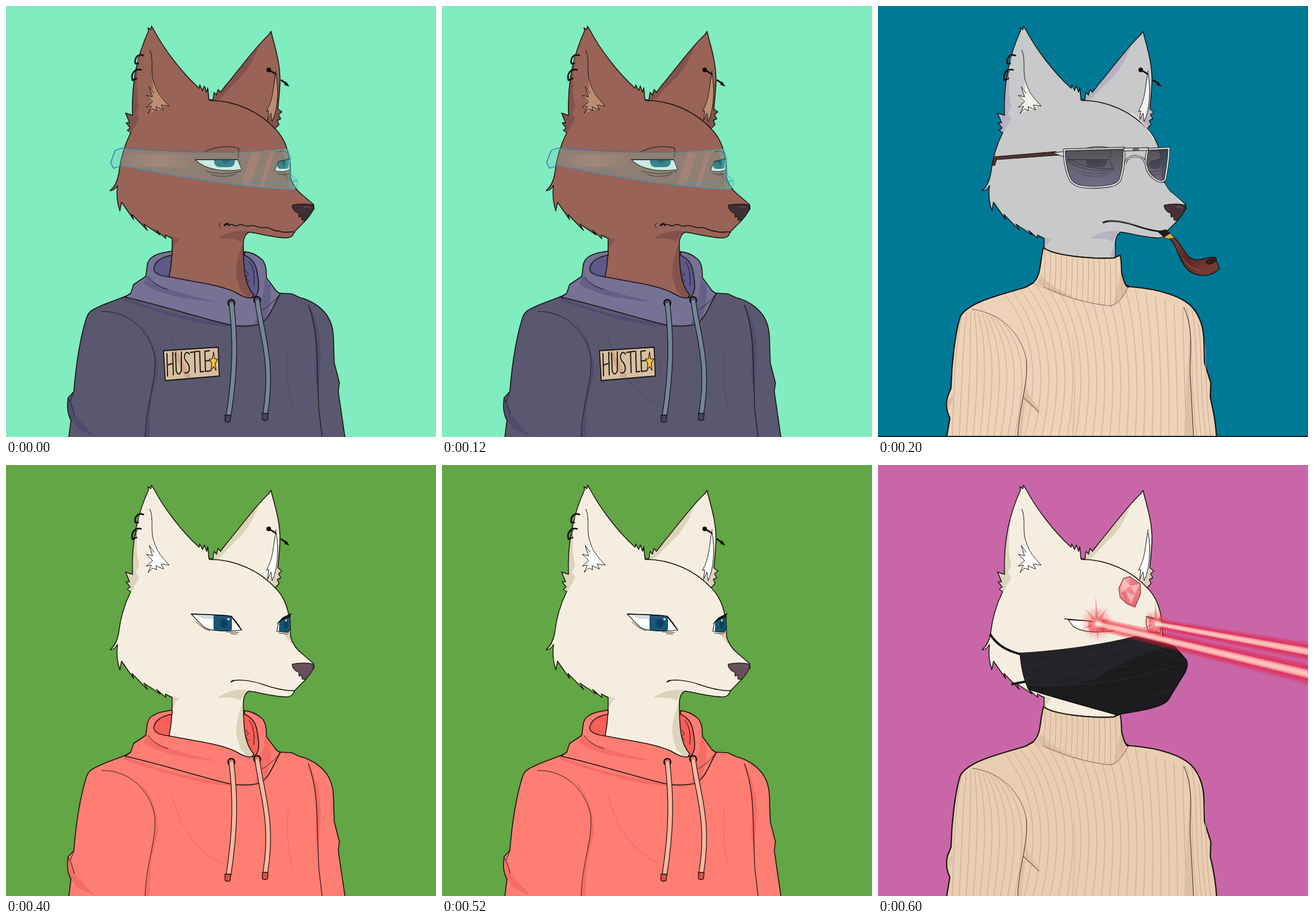
These frames come from a looping animation (748x749 px, 800 ms). An HTML page with a canvas:

```html
<!DOCTYPE html>
<html lang="en">
<head>
<meta charset="utf-8">
<title>Four outfits</title>
<style>
html, body { margin: 0; width: 100%; height: 100%; overflow: hidden; }
canvas { display: block; width: 100%; height: 100%; }
</style>
</head>
<body>
<canvas id="stage" width="748" height="749"></canvas>
<script>
const W = 748, H = 749, STEP = 200;
const g = document.getElementById('stage').getContext('2d');
const INK = '#17130f';

function fill(d, color) {
  g.fillStyle = color;
  g.fill(new Path2D(d));
}
function line(d, width = 1.3, color = INK) {
  g.strokeStyle = color;
  g.lineWidth = width;
  g.stroke(new Path2D(d));
}
function shape(d, color, width = 1.5, ink = INK) {
  fill(d, color);
  line(d, width, ink);
}
function dot(x, y, rx, ry, color) {
  g.fillStyle = color;
  g.beginPath();
  g.ellipse(x, y, rx, ry, 0, 0, 7);
  g.fill();
}
function clipped(d, draw) {
  g.save();
  g.clip(new Path2D(d));
  draw();
  g.restore();
}
function ramp(x0, y0, x1, y1, ...colors) {
  const r = g.createLinearGradient(x0, y0, x1, y1);
  colors.forEach((c, i) => r.addColorStop(i / (colors.length - 1), c));
  return r;
}
const mix = (a, b, k) => a + (b - a) * k;

// Head
const EARS = 'M217 220L211 216 216 212 209 203 215 203 208 186 220 190C218 130 229 85 248 43L247 38 252 41 253 35 258 43C275 75 305 115 336 143L337 137 342 147 345 139 349 150 351 142 353 163L360 163 362 150 366 155 369 145 373 150 383 137C410 105 435 70 457 50L461 44 464 56C472 85 479 112 476 145L473 179 480 184 474 189 478 196 472 199 475 206 468 213';
const FACE = 'C485 230 491 250 494 274L495 298C498 310 506 321 514 327L535 345 536 352 521 373 515 379 502 392C499 399 497 402 490 403C465 403 440 395 423 393C414 397 412 407 413 420C413 455 415 485 431 502L420 520 284 520 284 470C289 445 289 425 289 404L277 398 278 404 262 390 268 398 240 379 246 390 219 362 222 371 201 341 198 356C193 341 192 326 194 312C190 319 186 321 181 321C190 314 194 303 196 292C199 265 206 242 217 220Z';
const HEAD = EARS + FACE;
const NOSE = 'M498 346C512 343 527 344 535 346L535 353C530 363 524 370 520 373L515 372 514 365 510 367 509 360C503 359 497 351 498 346Z';

function drawHead(c) {
  fill(HEAD, c.fur);
  clipped(HEAD, () => {
    fill('M217 222L205 180 222 110 234 80C227 112 225 150 232 175L226 186 232 196Z', c.shade);
    fill('M355 168L400 110 440 70C430 95 418 115 408 124L385 147 373 160Z', c.shade);
    fill('M464 212L457 198 470 160 477 120 490 200Z', c.shade);
    fill('M368 404C388 391 408 388 430 393L440 398 414 398 408 410C398 402 383 405 368 404Z', c.shade);
    fill('M414 408C402 436 397 462 403 478L408 494 425 512 440 500Z', c.shade);
    fill('M277 398L302 406C293 411 289 424 287 440L283 410Z', c.shade);
    fill('M480 289L497 292 499 314Z', c.shade);
    fill('M196 335C206 359 231 377 258 387L278 405 220 384Z', c.shade);
  });
  line(HEAD, 1.5);
  line('M353 164C400 164 441 184 469 214', 1.6);
  fill('M254 105C253 129 262 150 284 174L271 175 274 181 262 180 247 187 253 178 244 176 254 169 244 155 254 158 249 140 256 145Z', c.ear);
  line('M250 76C258 94 250 116 258 135C263 151 271 160 284 174L270 172 274 181 261 175 262 182 255 179 247 187 253 174 244 176 255 166 244 155 255 158 249 140 258 152', 1);
  fill('M470 118C475 150 472 182 463 201L460 190 455 199 457 182 453 183C462 165 466 142 470 118Z', c.ear);
  line('M470 112C464 142 466 160 453 183L457 182 455 199 461 186 463 201C472 182 475 150 470 118', 1);
  if (c.rings) drawPiercings();
}

function drawPiercings() {
  g.lineCap = 'round';
  line('M239 86C229 82 223 91 225 100L230 100', 2.8, '#111');
  line('M235 111C223 108 217 119 220 129L227 126', 2.8, '#111');
  line('M231 87Q229 92 230 97M228 113Q225 118 226 123', 2, '#555');
  line('M457 111L469 118M479 129L489 136', 2.8, '#111');
  dot(457, 111, 4, 4, '#111');
  fill('M484 137L487 131 493 140Z', '#111');
  g.lineCap = 'butt';
}

function drawNose(color) {
  shape(NOSE, color, 1.2);
  line('M518 350Q528 347 530 352', 1, '#7c6870');
}

const MOUTH = 'M391 377C399 371 426 374 446 381C466 388 487 393 503 392';

// Hoodie
const HOOD_BODY = 'M109 752L113 720C105 705 107 690 108 681L118 670C122 620 130 575 139 545C143 530 150 528 165 521C185 512 205 507 217 500L476 499 497 500 512 507C530 511 548 523 558 537C568 552 570 566 570 590L571 620 580 655 578 670 590 752Z';
const HOOD_BACK = 'M249 445C261 431 275 428 289 426L415 427C435 429 451 440 452 460L440 515 255 475Z';
const HOOD_BAND = 'M207 506L217 499 222 484 243 470C246 455 244 445 252 438C262 430 275 428 289 426L289 433C267 437 258 446 257 457C258 466 270 469 285 471C330 480 370 484 398 497C412 505 420 509 430 507C441 502 441 487 438 470C436 450 430 440 415 433L415 427C430 428 440 436 446 441C453 450 453 463 453 472L470 495 477 500C465 520 458 545 441 553C425 557 400 557 385 553C320 537 270 520 207 506Z';

function drawHoodBack(c) {
  fill(HOOD_BODY, c.cloth);
  clipped(HOOD_BODY, () => {
    fill('M205 506C280 535 355 554 441 553L428 558C350 562 275 535 205 512Z', c.fold);
    fill('M225 545C260 580 267 622 253 661L241 752 249 752 252 690 264 640C265 590 245 560 225 545Z', c.fold);
    fill('M527 519C555 570 548 620 542 680L538 640C540 590 537 550 527 519Z', c.fold);
    fill('M108 682L119 710 155 749 125 735 112 718Z', c.fold);
    line('M288 572Q304 630 326 652Q346 678 376 692M491 595Q486 650 498 700', 1.5, c.fold);
  });
  line(HOOD_BODY, 1.6);
  line('M166 531C216 529 253 569 259 612C261 660 243 693 242 750', 0.9);
  line('M526 519C541 560 541 600 542 640L544 700 550 750', 1.2);
  line('M108 682Q114 691 119 710M118 670L112 687', 1);
  shape(HOOD_BACK, c.lining, 1.4);
}

function drawHoodFront(c) {
  shape(HOOD_BAND, c.band, 1.6);
  clipped(HOOD_BAND, () => {
    fill('M245 469C260 490 310 500 370 515C310 509 260 501 239 482Z', c.bandFold);
    fill('M450 472Q449 505 432 554L447 551Q464 519 460 487Z', c.bandFold);
  });
  line('M247 470Q259 487 282 493M475 503Q459 521 446 528', 0.9);
  line('M423 444Q434 458 431 486M417 460L422 467 416 472 423 479', 1);
  const strings = [
    'M392 516C399 575 400 630 387 713',
    'M437 511C444 570 466 618 451 709'
  ];
  strings.forEach((d, i) => {
    const x = i ? 437 : 392, y = i ? 511 : 516;
    dot(x, y, 7, 7, INK);
    dot(x, y, 4.5, 4.5, c.fold);
    line(d, 9.5);
    line(d, 7, c.cord);
    const ex = i ? 451 : 386, ey = i ? 708 : 711;
    shape(`M${ex - 5} ${ey}L${ex + 5} ${ey} ${ex + 4} ${ey + 11}Q${ex} ${ey + 14} ${ex - 5} ${ey + 11}Z`, c.tip, 1.3);
  });
}

// Sweater
const RIM = 'M288 420C305 434 372 440 410 438L421 433';
const KNIT = RIM + 'L424 465C428 481 430 488 441 488C490 492 531 505 548 525C561 541 567 562 567 584L568 620 579 655 578 680C584 705 588 725 589 752L119 752 125 716C117 700 119 687 121 679L127 664C128 620 134 570 143 540C156 516 204 504 256 489L274 479C284 466 282 440 288 420Z';
const COLLAR = RIM + 'C424 442 423 455 424 465C428 478 429 486 436 489C426 505 418 521 404 521C360 517 305 501 270 481C285 467 281 443 288 420Z';
const TORSO = 'M163 527C214 533 249 569 258 614C262 660 245 693 243 752L549 752 543 640C542 600 549 566 531 523L440 489 404 521 270 481Z';
const SLEEVE = 'M119 752L125 716C117 700 119 687 121 679L127 664C128 620 134 570 143 540L163 527C214 533 249 569 258 614C262 660 245 693 243 752Z';
const CUFF = 'M531 523C550 565 542 600 543 640L549 752 592 752 580 655 567 580 548 525Z';

function drawSweater(c) {
  const rib = c.rib;
  shape(KNIT, c.knit, 2.2);
  clipped(TORSO, () => {
    for (let i = 0; i < 20; i++) {
      const k = i / 19, top = mix(205, 532, k), end = mix(254, 536, k);
      const bend = mix(60, -4, k);
      line(`M${top} 484C${top + bend} 545 ${end + bend * .55} 630 ${end} 752`, 1, rib);
    }
    fill('M256 630L249 690 243 752 249 752 256 688 285 708 260 672Z', c.knitShade);
    fill('M336 560Q346 640 337 752L340 752Q348 635 336 560Z', c.knitShade);
    fill('M545 540L538 640 532 752 551 752Z', c.knitShade);
  });
  clipped(SLEEVE, () => {
    for (let i = 0; i < 10; i++) {
      const k = i / 9, top = mix(148, 207, k), end = mix(129, 237, k);
      const mid = mix(133, 258, k);
      line(`M${top} ${mix(528, 539, k)}C${mid} 590 ${mid} 650 ${end} 752`, 1, rib);
    }
    fill('M121 683L135 677 123 699Z', c.knitShade);
  });
  clipped(CUFF, () => {
    for (let i = 0; i < 4; i++) {
      const x = 541 + i * 8;
      line(`M${x - 5} 520C${x + 10} 580 ${x} 650 ${x + 14} 752`, 1, rib);
    }
  });
  shape(COLLAR, c.knit, 0.8, rib);
  clipped(COLLAR, () => {
    fill('M284 468L275 481 305 497 345 506Q300 490 284 468Z', c.knitShade);
    fill('M423 460L409 521 437 492Z', c.knitShade);
    for (let i = 0; i < 15; i++) {
      const x = 290 + i * 9.4;
      line(`M${x} 420Q${x + 3} 468 ${x - 7 + i * .7} 525`, 1, rib);
    }
  });
  line(RIM + 'C424 442 423 455 424 465C428 478 429 486 436 489M288 420C281 443 285 467 270 481L256 489', 2);
  line('M288 488C325 505 367 518 404 521Q420 518 434 491', 0.8, '#6b5244');
  line('M163 527C214 533 249 569 258 614', 1, '#6b5244');
  line('M258 614C262 660 245 693 243 750M253 680Q264 690 280 706M532 523C550 565 542 600 543 640L549 750', 0.9);
}

// Faces
function eyeShape(d, white, iris, x, y, rx, ry) {
  fill(d, white);
  clipped(d, () => {
    g.fillStyle = iris;
    g.beginPath();
    g.roundRect(x - rx, y - ry, rx * 2, ry * 2, rx * .5);
    g.fill();
    dot(x + 2, y + 1, rx * .4, ry * .45, 'rgba(5,30,50,.4)');
  });
  line(d, 1.1);
}

function sleepyEyes(white, iris) {
  eyeShape('M329 267L403 267 410 284C384 288 349 287 329 267Z', white, iris, 380, 266, 18, 14);
  eyeShape('M467 286L474 270 493 266 494 284C486 289 475 288 467 286Z', white, iris, 482, 271, 10, 12);
  line('M329 267L404 267M473 271L495 265', 2);
  line('M344 254C363 244 388 242 405 247L404 264M474 254L482 251 489 255M347 287Q377 296 409 287M357 293Q380 300 400 292M472 291Q484 296 494 290', 1);
}

function visorFace() {
  sleepyEyes('#eef5f1', '#216c7a');
  line('M380 383C380 376 390 377 387 382C393 375 398 386 404 381C412 376 414 386 424 382C435 379 438 387 449 385C459 383 462 391 474 391C486 396 493 391 503 393', 1.6);
  line('M380 382Q382 377 388 380', 3);
  line('M374 377Q367 381 374 386', 1);
  drawNose('#3d3034');
  const visor = 'M201 247C295 254 400 258 490 249L495 263 496 293 507 303 508 310 500 318C405 315 300 297 203 277L187 282 182 272 190 251Z';
  fill(visor, 'rgba(115,200,190,.27)');
  clipped(visor, () => {
    g.fillStyle = ramp(200, 0, 330, 0, 'rgba(214,157,137,0)', 'rgba(214,157,137,.3)', 'rgba(214,157,137,0)');
    g.fillRect(200, 258, 130, 22);
    fill('M427 255L443 255 424 315 408 315ZM459 255L467 255 448 315 440 315Z', 'rgba(232,150,130,.2)');
    fill('M480 240L510 240 510 320 494 320Z', 'rgba(100,220,210,.22)');
  });
  line(visor, 1.3, ramp(182, 0, 508, 0, '#3a86ad', '#5c658c', '#55747f', '#4ac7c4'));
  line('M201 247L190 251 182 272 187 282 203 277', 1.2, '#4277b0');
  line('M420 308L500 305 507 303M203 277C300 297 405 315 500 318', 1.3, '#4c94a8');
}

function drawPatch() {
  shape('M274 599L369 593 371 643 277 651Z', '#d8bfa2', 1.8);
  fill('M288 600L298 599 323 646 313 647Z', 'rgba(190,140,120,.45)');
  g.lineCap = 'round';
  line('M280 604L281 643M290 602L291 641M281 624L290 621M295 603L296 634Q300 645 305 634L305 601M319 605C313 596 307 609 313 617C322 626 320 641 311 637M321 602L335 600M328 601L329 637M337 600L338 636 344 635M354 599L346 600 347 635 356 634M347 617L354 616', 1.9);
  g.lineCap = 'butt';
  let star = '';
  for (let i = 0; i < 10; i++) {
    const a = -Math.PI / 2 + i * Math.PI / 5, r = i % 2 ? .42 : 1;
    star += (i ? 'L' : 'M') + (361 + Math.cos(a) * r * 7.5) + ' ' + (619 + Math.sin(a) * r * 18);
  }
  shape(star + 'Z', '#f2c53d', 1.1);
}

function shadesFace() {
  sleepyEyes('#b8b8be', '#26384c');
  clipped(HEAD, () => line('M440 186Q462 200 480 232M497 308Q509 323 532 345', 2.5, 'rgba(255,255,255,.6)'));
  line(MOUTH, 2.8);
  line('M400 374Q430 373 466 386', 0.8, '#77777b');
  drawNose('#453338');
  shape('M198 277L202 262 309 253 316 259 206 267 203 277Z', '#54312e', 1.2);
  shape('M303 255L325 253 327 264 315 259Z', '#d7d7da', 1);
  const lenses = [
    'M324 250L428 247C429 270 425 291 421 302C417 312 399 315 372 315C346 315 337 309 332 297C326 281 324 266 324 250Z',
    'M469 249L506 247C506 268 502 286 500 299C498 307 490 307 480 299C469 291 466 282 466 267Z'
  ];
  for (const d of lenses) {
    fill(d, ramp(0, 248, 0, 316, 'rgba(58,57,64,.83)', 'rgba(82,77,91,.83)', 'rgba(94,92,130,.84)'));
    line(d, 4.4);
    line(d, 2.6, '#d4d4d8');
  }
  line('M331 263C350 281 382 284 411 282', 1, 'rgba(15,15,20,.5)');
  shape('M427 247L470 246 470 251 427 252Z', '#d2d2d6', 1.1);
  line('M443 249L454 249', 3, '#555');
  const bridge = 'M430 274C433 260 449 258 459 264Q464 267 466 277';
  line(bridge, 3.6);
  line(bridge, 2, '#d4d4d8');
  drawPipe();
}

function drawPipe() {
  const pipe = 'M487 392L501 389 514 401C530 415 534 438 552 441C565 443 570 435 586 437L594 456C583 468 567 471 549 465C530 457 524 432 515 414Q508 401 495 399Z';
  shape(pipe, ramp(520, 410, 562, 466, '#713a32', '#582724', '#753b36'), 1.5);
  fill('M487 392L501 389 507 395 499 402Z', '#211b1d');
  shape('M497 402L508 395 516 403 505 405Z', '#d9a73e', 0.8);
  shape('M570 445Q576 436 588 437Q592 443 580 448Q571 450 570 445Z', '#361d1b', 1);
  line('M530 438Q541 457 562 460', 2, 'rgba(180,100,88,.5)');
}

function calmFace() {
  eyeShape('M322 259C351 260 376 260 392 263Q401 272 410 287C387 289 357 290 345 282C335 274 330 266 322 259Z', '#fff', '#145777', 377, 274, 16, 18);
  fill('M331 261L391 263 398 270 342 267Z', 'rgba(80,90,140,.22)');
  eyeShape('M471 289L474 273 494 262 495 283 491 291Z', '#fff', '#145777', 485, 276, 10, 18);
  fill('M470 277L481 265 497 257 494 264 480 270Z', INK);
  line('M322 259C351 260 376 260 392 263L410 287', 1.8);
  line('M330 272Q344 286 355 288M383 290L405 291M390 293L402 294M474 292L490 294', 0.9);
  dot(387, 268, 2, 2, '#cfe6ef');
  dot(487, 270, 1.5, 2, '#cfe6ef');
  line(MOUTH, 1.5);
  line('M391 377L397 374', 2.5);
  drawNose('#65505c');
}

function glow(x, y, r, color, alpha) {
  const s = g.createRadialGradient(x, y, 0, x, y, r);
  s.addColorStop(0, `rgba(${color},${alpha})`);
  s.addColorStop(1, `rgba(${color},0)`);
  g.fillStyle = s;
  g.fillRect(x - r, y - r, r * 2, r * 2);
}

function flare(x, y, size) {
  glow(x, y, size * .75, '245,70,75', .7);
  for (let i = 0; i < 10; i++) {
    const a = i * Math.PI / 5 - Math.PI / 2 - .05, r = size * (i ? .6 + .2 * (i % 2) : 1.2);
    const dx = Math.cos(a), dy = Math.sin(a);
    fill(`M${x - dy * 3} ${y + dx * 3}L${x + dx * r} ${y + dy * r} ${x + dy * 3} ${y - dx * 3}Z`, 'rgba(226,57,65,.4)');
  }
}

// Soft halo built from nested wedges, with a pale core
function beam(x, y, endY, size) {
  const wedge = (a, b, color) =>
    fill(`M${x} ${y - a}L752 ${endY - b} 752 ${endY + b} ${x} ${y + a}Q${x - a * 1.4} ${y} ${x} ${y - a}Z`, color);
  for (let i = 0; i < 12; i++) {
    const k = 1 - i / 12;
    wedge(12 * k * size, 20 * k * size, 'rgba(228,28,58,.13)');
  }
  for (let i = 0; i < 6; i++) {
    const k = 1 - i / 6;
    wedge(5 * k * size, 8 * k * size, 'rgba(255,208,198,.36)');
  }
  glow(x, y, 12, '255,242,232', .9);
}

function maskFace() {
  eyeShape('M331 269C348 271 383 269 408 280L410 288C384 292 352 291 339 280Z', '#fff', '#f7a19b', 382, 277, 16, 14);
  eyeShape('M467 266Q465 276 471 290L491 292 494 270Z', '#fff', '#f7a19b', 483, 277, 12, 14);
  line('M324 267C348 271 383 269 408 280M466 263L495 270', 1.3);
  line('M195 294C207 313 224 323 249 329M232 381L259 376', 4, '#111114');
  const mask = 'M247 327C316 323 396 312 452 297C475 300 503 307 517 317L536 338C540 345 538 352 535 359L505 408C497 419 470 426 415 434C375 423 303 403 262 390C252 369 249 348 247 327Z';
  shape(mask, '#1c1c1f', 1.5, '#0b0b0d');
  clipped(mask, () => {
    fill('M247 327L452 297 505 315Q424 339 381 370Q340 388 255 382Z', '#242428');
    line('M253 350Q340 338 433 316M258 370Q355 361 433 349M263 382Q396 389 517 349M443 310Q490 316 528 343M470 406L510 391', 1.1, '#2e2e33');
  });
  const gem = 'M419 214L427 197 438 194 456 206 457 223 447 247 433 241 421 230Z';
  fill(gem, ramp(420, 195, 455, 245, '#f7b0ad', '#ee858c', '#e0646f'));
  clipped(gem, () => {
    fill('M427 197L439 210 423 221ZM439 210L455 207 447 225ZM432 221L447 226 440 241Z', 'rgba(255,219,212,.55)');
    fill('M438 194L456 206 439 210ZM423 221L432 221 433 241Z', 'rgba(198,45,69,.25)');
  });
  line(gem, 1.4, '#a73d48');
  flare(381, 275, 40);
  flare(484, 275, 32);
  beam(484, 276, 325, .85);
  beam(381, 276, 364, 1);
}

const pale = { fur: '#f5eee0', shade: '#ddd2ba', ear: '#ffffff' };
const knit = { knit: '#ecd2b8', knitShade: '#dfbfa4', rib: '#c9a38c' };

const looks = [
  {
    bg: '#80ecc0', rings: true, hood: true, face: visorFace, extra: drawPatch,
    fur: '#996357', shade: '#84524d', ear: '#bd8c73',
    cloth: '#5a586f', fold: '#504c6d', lining: '#5f588b', band: '#757295', bandFold: '#656086',
    cord: '#74869a', tip: '#43435b'
  },
  {
    bg: '#007996', rings: true, face: shadesFace,
    fur: '#c8c9ca', shade: '#b9b0c2', ear: '#f2f2eb', ...knit,
    extra() { g.fillStyle = '#0b2630'; g.fillRect(0, 747, W, 2); }
  },
  {
    bg: '#62a645', rings: true, hood: true, face: calmFace, ...pale,
    cloth: '#ff7e73', fold: '#f66c65', lining: '#f95e58', band: '#ff7e73', bandFold: '#f76d65',
    cord: '#fdb7a1', tip: '#d94f4c'
  },
  {
    bg: '#c966a8', face: maskFace, ...pale, ...knit, knit: '#e8ceb2'
  }
];

function draw(c) {
  g.fillStyle = c.bg;
  g.fillRect(0, 0, W, H);
  g.lineJoin = 'round';
  if (c.hood) drawHoodBack(c);
  drawHead(c);
  if (c.hood) drawHoodFront(c);
  else drawSweater(c);
  c.face();
  if (c.extra) c.extra();
}

const start = performance.now();
let shown = -1;
function tick() {
  const i = Math.floor((performance.now() - start) / STEP) % looks.length;
  if (i !== shown) draw(looks[shown = i]);
  requestAnimationFrame(tick);
}
tick();
</script>
</body>
</html>
```
